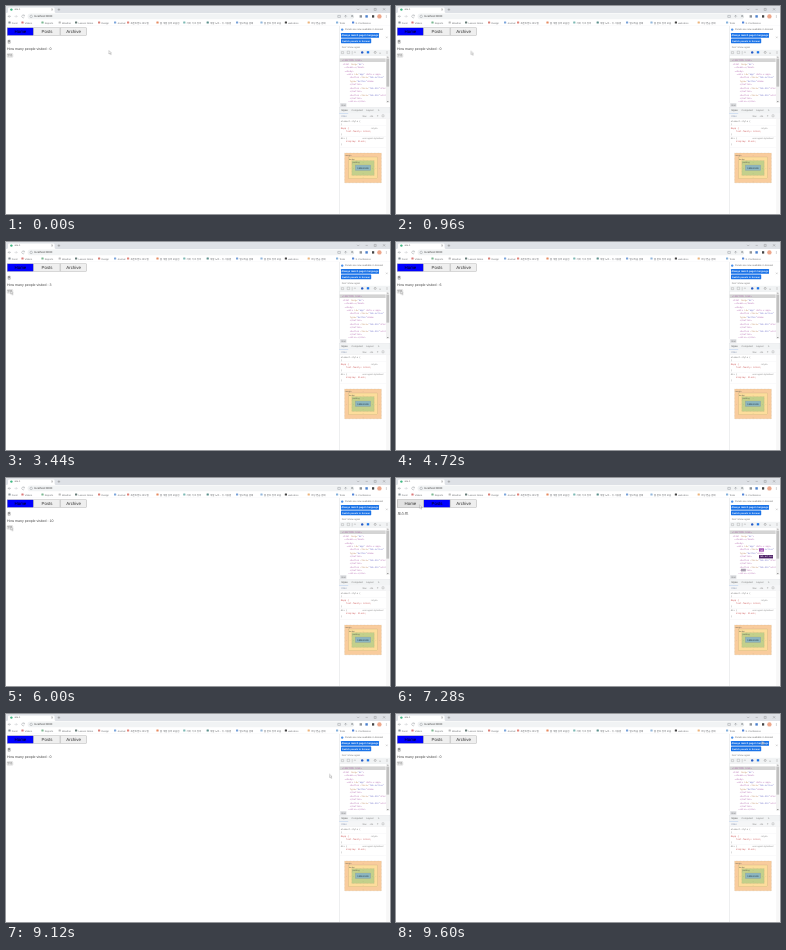
An HTML page for the animation above (9680 ms loop, 384x208 px).

```html
<!DOCTYPE html>
<html lang="en">
<head>
<meta charset="utf-8">
<title>Visitor counter</title>
<style>
  html, body { margin: 0; width: 100%; height: 100%; overflow: hidden; background: #fff; }
  svg { display: block; width: 384px; height: 208px; }
  text {
    font-family: "Liberation Sans", "Noto Sans CJK KR", "Noto Sans CJK", sans-serif;
    text-rendering: geometricPrecision;
    white-space: pre;
  }
  .mono { font-family: "DejaVu Sans Mono", monospace; }
  .soft { opacity: .6; }
  #cursor { animation: move 9680ms linear infinite; }
  #home { animation: home 9680ms step-end infinite; }
  #posts { animation: posts 9680ms step-end infinite; }
  #flash { animation: flash 9680ms linear infinite; }
  #hover { animation: hover 9680ms step-end infinite; }
  @keyframes move {
    0% { transform: translate(515px, 223px); }
    4.5% { transform: translate(505px, 224px); animation-timing-function: ease-in-out; }
    18.18% { transform: translate(108px, 230px); }
    24.8%, 63% { transform: translate(24px, 244px); animation-timing-function: ease-in-out; }
    70.5%, 72.5% { transform: translate(195px, 134px); }
    75.21% { transform: translate(118px, 135px); }
    77.2%, 79.6% { transform: translate(92px, 131px); animation-timing-function: ease-in-out; }
    94.21% { transform: translate(1617px, 302px); animation-timing-function: ease-out; }
    99.17%, 100% { transform: translate(1830px, 135px); }
  }
  @keyframes home { 0% { visibility: visible; } 72.3% { visibility: hidden; } 78.5%, 100% { visibility: visible; } }
  @keyframes posts { 0% { visibility: hidden; } 72.3% { visibility: visible; } 78.5%, 100% { visibility: hidden; } }
  @keyframes hover { 0% { opacity: 0; } 74.6% { opacity: 1; } 78.5%, 100% { opacity: 0; } }
  @keyframes flash {
    0%, 72.2% { opacity: 0; }
    72.3%, 75.3% { opacity: 1; }
    78.4% { opacity: 0; }
    78.5% { opacity: 1; }
    83%, 100% { opacity: 0; }
  }
</style>
</head>
<body>
<svg id="stage" viewBox="0 0 1920 1040"></svg>
<script>
const LOOP = 9680;
const esc = s => s.replace(/&/g, '&amp;').replace(/</g, '&lt;').replace(/>/g, '&gt;');
const box = (x, y, w, h, fill, more = '') =>
  `<rect x="${x}" y="${y}" width="${w}" height="${h}" fill="${fill}" ${more}/>`;
const label = (x, y, s, size = 12, fill = '#555', more = '') =>
  `<text x="${x}" y="${y}" font-size="${size}" fill="${fill}" ${more}>${esc(s)}</text>`;
const dot = (x, y, r, fill, more = '') => `<circle cx="${x}" cy="${y}" r="${r}" fill="${fill}" ${more}/>`;
const line = (d, color = '#85898e', w = 2) => `<path d="${d}" fill="none" stroke="${color}" stroke-width="${w}"/>`;
const dots = (x, y) => [0, 5, 10].map(d => dot(x, y + d, 1.5, '#777')).join('');
const mid = 'text-anchor="middle"';

function browser() {
  let s = box(0, 0, 1920, 35, '#dee1e6');
  s += `<path d="M2 35Q10 35 10 27V14Q10 7 18 7H235Q243 7 243 14V27Q243 35 251 35Z" fill="#fff"/>`;
  s += dot(27, 18, 6, '#41b883') + label(42, 22, 'vite-1', 12);
  s += line('M226 13l9 9m0-9l-9 9M258 18h13m-6.5-6.5v13', '#777');
  s += line('M1755 14l6 6 6-6M1798 17h11M1841 12h10v10h-10zM1885 11l11 11m0-11l-11 11', '#666', 1.5);

  s += box(0, 35, 1920, 65, '#fff');
  s += line('M25 52H11m6-6l-6 6 6 6');
  s += line('M42 52h14m-6-6l6 6-6 6', '#b8bbc0');
  s += line('M91 47a7 7 0 1 0 1 8M92 44v5h-5');
  s += box(108, 38, 1632, 28, '#f1f3f4', 'rx="14"');
  s += dot(126, 52, 6, 'none', 'stroke="#85898e" stroke-width="2"');
  s += label(141, 57, 'localhost:8080', 14, '#444');
  s += line('M1659 47h13v10h-13zM1692 53l6-7 6 7m-6-7v12M1726 56l5-11 5 11-9-7h9');
  s += box(1768, 46, 12, 12, '#8f9398') + box(1797, 46, 12, 12, '#4a7fcc');
  s += box(1830, 46, 11, 12, '#444') + dot(1867, 52, 11, '#eda78c') + dots(1901, 47);

  const marks = [
    [12, '#8b969c', 'Food'], [77, '#dc7a7a', 'Videos'], [177, '#7bb892', 'Reports'],
    [263, '#bbb', 'Weather'], [345, '#667c78', 'Lesson Notes'], [460, '#d98078', 'Design'],
    [540, '#7ca6dc', 'Journal'], [605, '#e28379', '프론트엔드 로드맵'],
    [752, '#e68a60', '웹 개발 강의 모음집'], [886, '#7dbab5', '자바 기초 정리'],
    [1003, '#5b908c', '개발 노트 - 깃 사용법'], [1150, '#77a0d8', '알고리즘 문제'],
    [1272, '#93b7dc', '웹 폰트 정리 모음'], [1394, '#444', 'web docs'],
    [1508, '#ecb47c', '코딩 연습 문제'], [1650, '#86b2dc', 'Tools'], [1730, '#5586d8', 'X. Conference']
  ];
  for (const [x, color, name] of marks) {
    s += box(x, 77, 11, 11, color, 'rx="2"') + label(x + 17, 88, name, 12, '#66686c');
  }
  return s + box(0, 99, 1920, 1, '#e8eaed');
}

function tab(x, name, on) {
  return box(x, 109, 131, 38, on ? '#0000ff' : '#efefef', 'stroke="#a4a4a4" stroke-width="2"') +
    label(x + 66, 136, name, 22, on ? '#000' : '#333', mid);
}
const tabs = active => ['Home', 'Posts', 'Archive'].map((n, i) => tab(6 + i * 133, n, i === active)).join('');

function pages() {
  const home = tabs(0) + label(6, 185, '홈', 20, '#444') +
    label(5, 222, 'How many people visited : 0', 17.8, '#444', 'id="visits"') +
    box(6, 238, 28, 18, '#efefef', 'stroke="#b5b5b5" stroke-width="1.5" rx="2"') +
    label(20, 252, '방문', 13, '#666', mid);
  const posts = tabs(1) + `<g id="hover">${tab(6, 'Home', false).replace('#efefef', '#e2e2e2')}</g>` +
    label(7, 184, '포스트', 20, '#444');
  return `<g id="home">${home}</g><g id="posts">${posts}</g>`;
}

// Tag names purple, attributes brown, quoted values blue.
function code(x, y, s) {
  const color = p => p[0] === '"' ? '#1a1aa8' : /^[a-z-]+=$/.test(p) ? '#994500' : '#881280';
  const parts = s.split(/("[^"]*"|[a-z-]+=)/).filter(Boolean).map(p =>
    `<tspan fill="${color(p)}">${esc(p)}</tspan>`).join('');
  return `<text class="mono soft" x="${x}" y="${y}" font-size="11">${parts}</text>`;
}

function tree() {
  const rows = [
    [1680, '<!DOCTYPE html>'], [1684, '<html lang="ko">'], [1692, '▸<head>…</head>'], [1692, '▾<body>'],
    [1702, '▾<div id="app" data-v-app>'], [1719, '<button class="tab-active"'],
    [1719, 'type="button">Home'], [1719, '</button>'], [1719, '<button class="tab-btn">Posts'],
    [1719, '</button>'], [1719, '<button class="tab-btn">Archive'], [1719, '</button>'], [1712, '▸<div>…</div>']
  ];
  let s = box(1667, 262, 232, 18, '#d4d4d4');
  rows.forEach(([x, t], i) => s += code(x, 276 + i * 17.2, t));
  s += `<g id="flash">${box(1815, 351, 25, 17, '#a04bb0')}${box(1815, 385, 70, 17, '#4f2268')}` +
    label(1817, 363, 'tab', 11, '#fff', 'class="mono"') +
    label(1817, 397, 'tab-active', 11, '#fff', 'class="mono"') +
    box(1725, 454, 24, 13, '#aaa1b1') + '</g>';
  return `<g clip-path="url(#treeClip)">${s}</g>`;
}

function boxModel() {
  const rings = [
    [1693, 735, 184, 149, '#f9cc9d'], [1712, 755, 146, 109, '#fddd9b'],
    [1729, 773, 112, 74, '#c3d08b'], [1746, 795, 78, 28, '#8cb6c0']
  ];
  const names = ['margin', 'border', 'padding'];
  let s = '';
  rings.forEach(([x, y, w, h, fill], i) => {
    s += box(x, y, w, h, fill, `stroke="#a08c6c" stroke-width="1" ${i % 2 ? '' : 'stroke-dasharray="4 3"'}`);
    if (names[i]) {
      s += label(x + 3, y + 13, names[i], 10, '#665');
      s += label(1785, y + 13, '-', 10, '#665', mid) + label(1785, y + h - 5, '-', 10, '#665', mid);
      s += label(x + 7, 813, '-', 10, '#665') + label(x + w - 11, 813, '-', 10, '#665');
    }
  });
  return s + label(1785, 813, '1656.8×36', 12, '#234', mid);
}

function devtools() {
  let s = box(1665, 100, 255, 940, '#fff') + box(1665, 100, 2, 940, '#d4d6da');
  s += dot(1681, 118, 6, '#4a8fe8') + label(1695, 122, 'Panels are now available in Korean!', 12, '#666');
  s += box(1675, 135, 190, 24, '#1a73e8', 'rx="2"');
  s += label(1770, 152, "Always match page's language", 12.5, '#fff', mid + ' font-weight="700"');
  s += box(1675, 163, 151, 23, '#1a73e8', 'rx="2"');
  s += label(1750, 179, 'Switch panels to Korean', 12, '#fff', mid + ' font-weight="700"');
  s += label(1679, 209, "Don't show again", 12, '#777');
  s += line('M1900 153l8 8m0-8l-8 8', '#888', 1.5);

  s += box(1667, 219, 253, 29, '#f1f3f4') + box(1667, 247, 253, 1, '#d4d6da');
  s += line('M1677 228h11v10h-11zM1706 226h12v12h-12zM1731 225v17', '#888', 1.5);
  s += label(1739, 237, '‹›', 15, '#777') + dot(1781, 232, 6, '#2459c4') + box(1804, 226, 12, 11, '#1a73e8');
  s += dot(1846, 232, 5, 'none', 'stroke="#777" stroke-width="2"') + label(1866, 238, '»', 15, '#777') + dots(1905, 227);

  s += tree() + box(1900, 249, 18, 236, '#f1f1f1') + box(1902, 263, 14, 140, '#c1c1c1');
  s += `<path d="M1904 258l5-6 5 6zM1904 475l5 6 5-6z" fill="#888"/>`;
  s += box(1667, 485, 253, 21, '#fff') + box(1671, 486, 31, 18, '#dcdee1') + label(1677, 499, 'html', 11, '#777');

  s += box(1667, 506, 253, 31, '#f1f3f4', 'stroke="#d4d6da"');
  s += label(1676, 526, 'Styles', 12, '#444') + label(1728, 526, 'Computed', 12, '#777');
  s += label(1801, 526, 'Layout', 12, '#777') + label(1859, 526, '»', 15, '#777') + box(1667, 535, 44, 2, '#1a73e8');
  s += box(1667, 537, 253, 26, '#f5f6f7') + box(1667, 562, 253, 1, '#d4d6da');
  s += label(1677, 554, 'Filter', 12, '#7d8ba8') + label(1780, 554, ':hov', 12, '#777');
  s += label(1818, 554, '.cls', 12, '#777') + label(1854, 555, '+', 16, '#777') + line('M1880 544h10v10h-10z', '#888', 1.5);

  const css = [
    [578, 'element.style {', '#777'], [594, '}', '#777'], [613, '#app {', '#c55'],
    [629, '    font-family: Arial;', '#c55'], [645, '}', '#777'],
    [665, 'div {', '#777'], [681, '    display: block;', '#c55'], [697, '}', '#777']
  ];
  for (const [y, t, fill] of css) s += label(1674, y, t, 11, fill, 'class="mono"');
  s += label(1824, 613, '<style>', 11, '#888') + label(1782, 665, 'user agent stylesheet', 11, '#888', 'font-style="italic"');
  for (const y of [599, 650, 705]) s += box(1667, y, 234, 1, '#e4e6e9');
  return s + box(1901, 563, 17, 477, '#f7f7f7') + boxModel();
}

const cursor = `<path id="cursor" d="M0 0V17L4 13L7 20L10 19L7 12H12Z" fill="#fff" stroke="#555" stroke-width="1.3"/>`;

document.getElementById('stage').innerHTML =
  `<defs><clipPath id="treeClip">${box(1667, 249, 232, 236, '#000')}</clipPath></defs>` +
  box(0, 0, 1920, 1040, '#fff') + pages() + browser() + devtools() + cursor;

const visits = document.getElementById('visits');
let shown = 0;
function tick() {
  const t = performance.now() % LOOP;
  const n = t < 2640 || t > 7000 ? 0 : Math.min(10, 1 + Math.floor((t - 2640) / 350));
  if (n !== shown) visits.textContent = `How many people visited : ${shown = n}`;
  requestAnimationFrame(tick);
}
tick();
</script>
</body>
</html>
```
